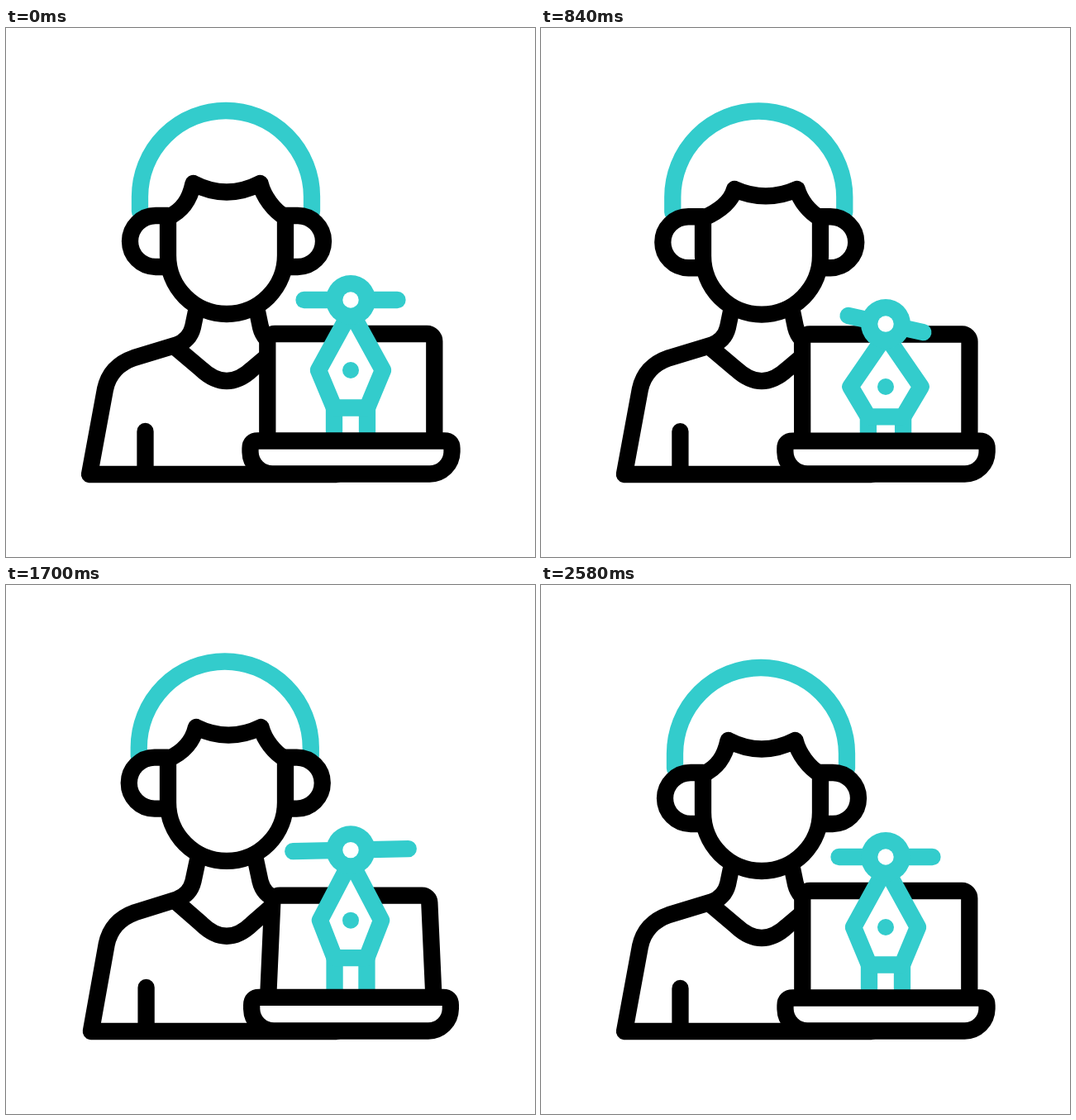
Animation of 640x640 px, one loop 2880 ms. Source, as an HTML page with a canvas:

```html
<!DOCTYPE html>
<html lang="en">
<head>
<meta charset="utf-8">
<title>Designer</title>
<style>
  html, body { margin: 0; width: 100%; height: 100%; overflow: hidden; background: #fff; }
  canvas { display: block; width: 640px; height: 640px; }
</style>
</head>
<body>
<canvas id="stage" width="640" height="640"></canvas>
<script>
const ctx = document.getElementById('stage').getContext('2d');
const LOOP = 2880, BEGIN = 220, END = 2580;
const BLACK = '#000', TEAL = '#33cccc', WHITE = '#fff';

// Sine-eased motion through a few [time, value] keys.
const track = (...keys) => t => {
  const next = keys.findIndex(([time]) => time > t);
  if (next === 0) return keys[0][1];
  if (next < 0) return keys[keys.length - 1][1];
  const [t0, v0] = keys[next - 1], [t1, v1] = keys[next];
  return v0 + (v1 - v0) * (1 - Math.cos(Math.PI * (t - t0) / (t1 - t0))) / 2;
};

// Stretch, squash and hold, then a smaller echo of both: 1 is stretched, -1 squashed.
const bounce = (landing, echo) => track(
  [BEGIN, 0], [470, 1], [landing, -1], [1400, -1], [1820, .57], [2080, -echo], [END, 0]);

const bodyBounce = bounce(1200, .84);
const penBounce = bounce(900, .6);
const headNod = track([BEGIN, 0], [470, .45], [1300, -.75], [1400, -.75], [1860, 1.15], [2140, -.73], [END, 0]);
const headTurn = track([440, 0], [1200, 1], [1400, 1], [1850, 0]);
const handleSwing = track([440, 0], [840, 12.5], [1400, 8], [1900, -6], [2160, 4], [END, 0]);
const handleReach = track([BEGIN, 56.5], [840, 46.5], [1440, 58.5], [1880, 76], [2240, 52], [END, 56.5]);

// Vertical offset: so many pixels up when stretched, down when squashed.
const shift = (amount, up, down) => -amount * (amount > 0 ? up : down);

function poseAt(t) {
  const body = bodyBounce(t), pen = penBounce(t), nod = headNod(t);
  return {
    nod,
    crown: shift(body, 27, 17),
    ear: shift(body, 27, 15) - 17 * nod,
    chin: shift(body, 27, 10) - 7 * nod,
    turn: headTurn(t),
    body: shift(body, 7, 5.8),
    base: shift(body, 6, 5.2),
    tilt: shift(body, 18, 4),
    lidDrop: 20 * Math.abs(body),
    pen: shift(pen, 30, 32),
    collar: shift(pen, 30, 12),
    angle: handleSwing(t) * Math.PI / 180,
    reach: handleReach(t)
  };
}

function stroke(path, color = BLACK, fill) {
  const shape = new Path2D(path);
  if (fill) {
    ctx.fillStyle = fill;
    ctx.fill(shape);
  }
  ctx.strokeStyle = color;
  ctx.stroke(shape);
}

function circle(x, y, r, color) {
  ctx.beginPath();
  ctx.arc(x, y, r, 0, Math.PI * 2);
  ctx.fillStyle = color;
  ctx.fill();
}

function drawHair(p) {
  const dx = -5 * p.turn, top = 204 + p.crown, end = 222 + .8 * p.ear;
  stroke(`M${162 + dx} ${end} V${top} A104 104 0 0 1 ${370 + dx} ${top} V${end}`, TEAL);
}

function drawBody(p) {
  const sx = 1 + p.body / 176, sy = 1 - p.body * .0103;
  const at = (x, y) => `${267 + (x - 267) * sx} ${540 - (540 - y) * sy}`;
  const neckY = 338 + p.chin, neckHalf = 36 + .2 * p.chin;

  stroke(`M${267 - neckHalf} ${neckY} L${at(226, 362)} Q${at(222, 378)} ${at(206, 383.5)}
    L${at(155, 399)} Q${at(126, 409)} ${at(120, 437)} L${at(101, 540)} H400`);
  stroke(`M${267 + neckHalf} ${neckY} L${at(308, 362)} Q${at(312, 378)} ${at(328, 383.5)} L${at(379, 399)}`);
  stroke(`M${at(207, 388)} L${at(236, 412.5)} Q${at(267, 441.5)} ${at(298, 412.5)} L${at(327, 388)}`);
  stroke(`M${at(168.5, 488)} L${at(168.5, 538)}`);
}

function drawHead(p) {
  const { ear, turn } = p, dx = -5 * turn;
  const top = 227 + ear, jaw = 275 + p.chin;
  const tip = 188 + ear + 10 * turn + 5 * Math.max(0, -p.nod);
  const dip = 209 + ear + 3 * turn;
  const left = 226.5 + 14 * turn, right = 307.5 + 4 * turn;

  stroke(`M196 ${top} H${181 + dx} a31 31 0 0 0 0 62 H196`);
  stroke(`M338 ${top} H${353 + dx} a31 31 0 0 1 0 62 H338`);
  stroke(`M196 ${top + 1} V${jaw} A71 71 0 0 0 338 ${jaw} V${top + 1}`);
  stroke(`M196 ${top + 2} C214 ${top - 6} ${left - 4} ${tip + 19 - 6 * turn} ${left} ${tip}
    Q${(left + right) / 2} ${dip} ${right} ${tip}
    C${right + 4} ${tip + 16 - 4 * turn} 324 ${top - 6} 338 ${top + 2}`);
}

function drawLid(p) {
  const x = 417.3, y = 370 + p.lidDrop;
  const foot = 101 + .8 * p.base, top = foot + p.tilt, hinge = foot - .1 * p.tilt;
  ctx.beginPath();
  ctx.moveTo(x - hinge, 499);
  ctx.arcTo(x - top, y, x, y, 9);
  ctx.arcTo(x + top, y, x + hinge, 499, 9);
  ctx.lineTo(x + hinge, 499);
  ctx.fillStyle = WHITE;
  ctx.fill();
  ctx.strokeStyle = BLACK;
  ctx.stroke();
}

function drawPen(p) {
  const x = 417, ring = 329 + p.pen, bottom = 459.5 + p.collar;
  const dot = 414 + (p.pen + p.collar) / 2;
  const spread = .22 * p.collar + .07 * (p.pen - p.collar);
  const side = 39 + spread, leg = 20 + .3 * spread;

  stroke(`M${x - leg} ${bottom} V499 M${x + leg} ${bottom} V499`, TEAL);
  stroke(`M${x} ${ring + 14} L${x - side} ${dot} L${x - leg} ${bottom}
    H${x + leg} L${x + side} ${dot} Z`, TEAL, WHITE);
  circle(x, dot, 10, TEAL);

  const hx = p.reach * Math.cos(p.angle), hy = p.reach * Math.sin(p.angle);
  stroke(`M${x - hx} ${ring - hy} L${x + hx} ${ring + hy}`, TEAL);
  circle(x, ring, 30 + Math.min(0, p.collar) * .06, TEAL);
  circle(x, ring, 9.7, WHITE);
}

function drawBase(p) {
  const half = 122 + p.base, l = 417.5 - half, r = 417.5 + half;
  const y = 499.5 + .4 * p.base;
  stroke(`M${l + 9} ${y} H${r - 9} Q${r} ${y} ${r} ${y + 9} V513
    A27 27 0 0 1 ${r - 27} 539.5 H${l + 27} A27 27 0 0 1 ${l} 513
    V${y + 9} Q${l} ${y} ${l + 9} ${y} Z`, BLACK, WHITE);
}

function draw(t) {
  const pose = poseAt(t);
  ctx.fillStyle = WHITE;
  ctx.fillRect(0, 0, 640, 640);
  ctx.lineWidth = 20.3;
  ctx.lineCap = ctx.lineJoin = 'round';
  [drawHair, drawBody, drawHead, drawLid, drawPen, drawBase].forEach(part => part(pose));
}

const start = performance.now();
function tick() {
  draw((performance.now() - start) % LOOP);
  requestAnimationFrame(tick);
}
tick();
</script>
</body>
</html>
```
